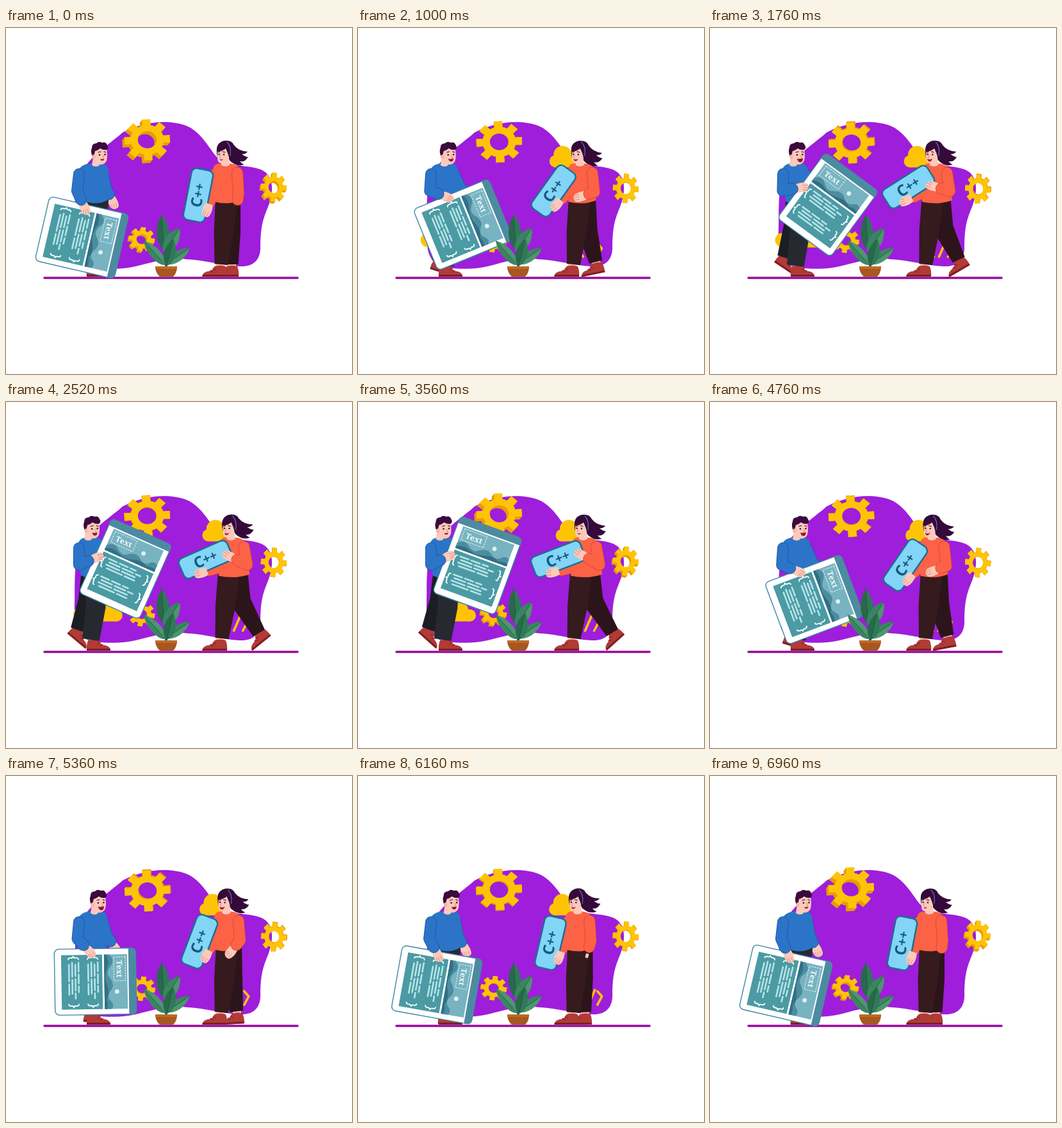
An HTML page that plays this animation: 540 px wide and 540 px high, repeating every 7 s.

```html
<!DOCTYPE html>
<html lang="en">
<head>
<meta charset="utf-8">
<title>App builders</title>
<style>
  html, body { margin: 0; width: 100%; height: 100%; overflow: hidden; background: #fff; }
  svg { display: block; width: 100vw; height: 100vh; }
  .line { fill: none; stroke-linecap: round; stroke-linejoin: round; }
  .cloth { stroke-width: 3; stroke-linejoin: round; }
  .yellow { fill: #fdc406; }
</style>
</head>
<body>
<svg viewBox="0 0 540 540">
  <defs>
    <g id="shoe">
      <path d="M4-22H17V-14H4Z" fill="#f9c2b4"/>
      <path d="M2-16Q10-19 19-16Q21-9 30-8Q37-6 37 0H0Q-1-8 2-16Z" fill="#b23a37"/>
      <path d="M0-3H37V0H0Z" fill="#7c2026"/>
      <path d="M17-10L21-13M21-7L25-10" class="line" stroke="#7c2026"/>
    </g>
    <g id="hand">
      <path d="M-10-6Q-2-8 4-7Q11-6 11-2Q12 4 6 7Q-2 8-10 6Z" fill="#fcc9ba"/>
      <path d="M3-3L10-2M3 1L10 2M2 4L7 5" class="line" stroke="#d9897f" stroke-width=".9"/>
    </g>
  </defs>

  <path fill="#9e1edb" d="M120 222C132 200 158 184 182 163C215 146 250 143 277 151C300 158 312 179 326 198C342 219 374 212 398 221C419 230 419 256 407 284C398 305 397 322 397 345C396 364 384 373 364 372C338 371 310 362 283 361C258 358 236 363 214 369C188 377 152 378 130 372C110 365 106 345 107 312C108 285 104 247 120 222Z"/>
  <path d="M60 390H455" class="line" stroke="#990b9b" stroke-width="3.6"/>
  <g id="gears"></g>

  <g id="cloudL" class="yellow">
    <circle cx="115" cy="331" r="11"/><circle cx="133" cy="319" r="16"/>
    <circle cx="156" cy="326" r="13"/><circle cx="171" cy="333" r="9.5"/>
    <path d="M115 327H171V342.5H115Z"/>
  </g>
  <g id="cloudR" class="yellow">
    <circle cx="325" cy="198" r="14"/><circle cx="314" cy="208" r="9.5"/>
    <circle cx="341" cy="206" r="11"/><path d="M314 205H341V217.500H314Z"/>
  </g>
  <path id="code" class="line" stroke="#fdc406" stroke-width="3.6" d="M349 335L340 346L347 357M365 334L355 357M369 336L376 344L369 357"/>

  <g id="man">
    <g id="mArmB"></g>
    <use id="mShoeB" href="#shoe"/>
    <polygon id="mLegB" fill="#1b1e23"/>
    <use href="#shoe" x="126" y="388"/>
    <polygon id="mLegF" fill="#262a30"/>
    <path id="mBody" class="cloth" fill="#2b74c8" stroke="#2b74c8"/>
    <g id="mHead">
      <path d="M-10-8L10-9Q12 2 10 10Q7 17-1 16L-2 18Q-8 21-13 17L-11 5Z" fill="#fcc9ba"/>
      <path d="M-11 6Q-16-4-13-10Q-13-17-6-17Q-2-21 3-18Q9-20 11-14Q14-10 10-7Q5-6 0-9Q-4-6-8-5Q-10 0-9 5Z" fill="#3b0b3d"/>
      <ellipse cx="-10" cy="4" rx="2.6" ry="3.5" fill="#f5b5a7"/>
      <path d="M-3-3L1-4M6-4L9-3" class="line" stroke="#3b0b3d" stroke-width="1.2"/>
      <circle cx="-1" cy="1" r="1.3" fill="#2a1230"/><circle cx="7.5" cy=".5" r="1.3" fill="#2a1230"/>
      <path d="M4 1L6 5L4 5.5" class="line" stroke="#d9897f"/>
      <path id="mMouth" d="M-3-1Q2 0 6-2Q6 4 2 4Q-2 4-3-1Z" fill="#8c1b2c"/>
    </g>
  </g>

  <g id="tablet">
    <rect x="-51.5" y="-63.5" width="103" height="127" rx="7" fill="#fff" stroke="#3f87a5" stroke-width="1.4"/>
    <path d="M-51.5-52V-57Q-51.5-63.5-45-63.5H45Q51.5-63.5 51.5-57V-52Z" fill="#4c8b9f"/>
    <path d="M-42-50H43V-14H-42Z" fill="#78b3c1"/>
    <path d="M-42-22Q-34-31-25-25Q-14-15-5-23Q6-31 14-24Q24-16 31-24Q37-30 43-25V-14H-42Z" fill="#4b8d9f"/>
    <path d="M-42-17Q-31-23-20-18Q-7-13 5-18Q18-23 28-17Q36-20 43-18V-14H-42Z" fill="#326f86"/>
    <circle cx="16" cy="-33.5" r="3.4" fill="#dcf1f3"/>
    <path d="M-42-11H43V53H-42Z" fill="#4b9aa4"/>
    <rect x="-38" y="-47" width="37" height="18" fill="none" stroke="#e7f8f8" stroke-dasharray="2.5 1.5"/>
    <text x="-19.5" y="-33.5" text-anchor="middle" font-family="'Noto Serif', serif" font-size="12" font-weight="600" fill="#f3ffff">Text</text>
    <g id="blocks" class="line"></g>
  </g>
  <g id="mArmF"></g>

  <g id="woman">
    <g id="wArmB"></g>
    <use id="wShoeB" href="#shoe"/>
    <polygon id="wLegB" fill="#2c151a"/>
    <use href="#shoe" transform="translate(345 388) scale(-1.04 1)"/>
    <polygon id="wLegF" fill="#351a1e"/>
    <path id="wHair" fill="#350a38" d="M-9 5Q-14-17 1-21Q13-23 17-14Q24-5 38-4Q35 0 29 0Q36 5 39 4Q34 13 26 11Q30 16 33 16Q23 20 14 13Q9 10 8 5Z"/>
    <path id="wBody" class="cloth" fill="#fb6246" stroke="#fb6246"/>
    <g id="wHead">
      <path d="M-9-9Q0-13 9-9L9 7L10 17Q3 21-3 17L-3 14Q-9 14-9 6Z" fill="#fcc9ba"/>
      <path d="M-10-4Q-11-19 2-20Q15-19 14-4Q14 5 10 8Q8-1 4-9Q-2-4-10-4Z" fill="#350a38"/>
      <path d="M6-19Q13-12 11 2" class="line" stroke="#5563b5" stroke-width="1.4"/>
      <circle cx="-6.5" r="1.2" fill="#2a1230"/><circle cx="1" cy=".5" r="1.2" fill="#2a1230"/>
      <path d="M-8-3L-5-4M-1-4L3-3" class="line" stroke="#350a38" stroke-width="1.1"/>
      <path d="M-4 1L-6 5L-4 5.5" class="line" stroke="#d9897f"/>
      <path id="wMouth" d="M-5-1Q-1 1 3-1Q1 4-2 3.5Q-5 3-5-1Z" fill="#b02338"/>
    </g>
  </g>

  <g id="phone">
    <rect x="-41" y="-17" width="82" height="34" rx="8" fill="#82d5f7" stroke="#1c6d94" stroke-width="2.4"/>
    <text y="8" text-anchor="middle" font-family="'Open Sans', sans-serif" font-size="24" font-weight="700" fill="#155a7d">C<tspan font-size="20" dy="-1.5">++</tspan></text>
  </g>
  <use id="wHandB" href="#hand"/>
  <g id="wArmF"></g>

  <g id="plant"></g>
  <path d="M233 372H267Q267 382 261 388H240Q233 382 233 372Z" fill="#a6581f"/>
  <path d="M233 372H267L266.5 376H233.5Z" fill="#bf6a29"/>
</svg>

<script>
const LOOP = 7000, STEP = 40, HALF = LOOP / 2;
const $ = id => document.getElementById(id);
const set = (node, attrs) => { for (const k in attrs) node.setAttribute(k, attrs[k]); return node; };
const add = (parent, tag, attrs) =>
  parent.appendChild(set(document.createElementNS('http://www.w3.org/2000/svg', tag), attrs));
const place = (id, x, y, turn = 0, sx = 1, sy = sx) =>
  set($(id), { transform: `translate(${x} ${y}) rotate(${turn}) scale(${sx} ${sy})` });
const mix = (a, b, p) => a + (b - a) * p;
const clamp = v => Math.max(0, Math.min(1, v));

// Bezier timing (.33, 0) (.18, 1), solved by bisection
function ease(u) {
  let lo = 0, hi = 1;
  for (let i = 0; i < 22; i++) {
    const s = (lo + hi) / 2, r = 1 - s;
    const x = 3 * s * r * r * .33 + 3 * s * s * r * .18 + s ** 3;
    if (x < u) lo = s; else hi = s;
  }
  return lo * lo * (3 - 2 * lo);
}

function gearPath(r, turn, hole) {
  const body = r * .72;
  let d = '';
  for (let i = 0; i < 8; i++) {
    [-14, -10.5, 10.5, 14].forEach((off, j) => {
      const a = (i * 45 + turn + off) * Math.PI / 180, rad = j % 3 ? r : body;
      const join = i + j === 0 ? 'M' : j ? 'L' : `A${body} ${body} 0 0 1 `;
      d += `${join}${rad * Math.sin(a)} ${-rad * Math.cos(a)}`;
    });
  }
  return d + `ZM${hole} 0A${hole} ${hole} 0 1 0 ${-hole} 0A${hole} ${hole} 0 1 0 ${hole} 0Z`;
}

const DEPTH = 5;
function makeGear(x, y, r, turn, sx, sy) {
  const d = gearPath(r, turn, r * .41), layers = [];
  for (let i = DEPTH; i >= 0; i--)
    layers.push(add($('gears'), 'path', { d, 'fill-rule': 'evenodd', fill: i ? '#e99a08' : '#fdc406' }));
  return { x, y, r, sx, sy, layers };
}
const gears = [
  makeGear(220.5, 178, 36, -3, 1, .9),
  makeGear(418, 250.5, 23, 4, .88, 1),
  makeGear(212, 331.5, 20.5, 8, 1, .92)
];

// Rocking shows the rim below left, then slightly above right
function drawGears(k) {
  for (const { x, y, r, sx, sy, layers } of gears)
    layers.forEach((layer, i) => {
      const n = 1 - i / DEPTH;
      const cx = x - r * .1 * k * n, cy = y + r * k * (.13 * n - .1);
      set(layer, { transform: `translate(${cx} ${cy}) scale(${sx} ${sy})` });
    });
}

// Code rows and braces on the tablet
for (const top of [-4, 26]) {
  for (let i = 0; i < 4; i++)
    add($('blocks'), 'path', { d: `M${-30 + i % 2 * 3} ${top + i * 5}h${46 + i * 7 % 10}`, stroke: '#b6e4e8',
      'stroke-width': 2.6, 'stroke-dasharray': `${14 + i * 4} 4.5` });
  for (const s of [-1, 1])
    add($('blocks'), 'path', { d: `M${s * 35} ${top}q${s * 3} 0 ${s * 2.5} 5q0 2.5 ${s * 2.5} 3q${-s * 2.5} .5 ${-s * 2.5} 3q${s * .5} 5 ${-s * 2.5} 5`,
      stroke: '#f4ffff', 'stroke-width': 1.9 });
}

function leaf(x, y, tx, ty, w, light, dark) {
  const dx = tx - x, dy = ty - y, len = Math.hypot(dx, dy);
  const nx = -dy / len * w * 1.33, ny = dx / len * w * 1.33;
  const side = (s, n) => `${x + dx * s + nx * n} ${y + dy * s + ny * n}`;
  add($('plant'), 'path', { d: `M${x} ${y}L250 374`, stroke: '#246848', 'stroke-width': 2 });
  [light, dark].forEach((fill, i) => {
    const n = i ? -1 : 1;
    add($('plant'), 'path', { d: `M${x} ${y}C${side(.15, n)} ${side(.7, n)} ${tx} ${ty}Z`, fill });
  });
  add($('plant'), 'path', { d: `M${x} ${y}L${tx} ${ty}`, stroke: '#1d583e', 'stroke-width': .8 });
}
leaf(247, 346, 243, 292, 10, '#2f7958', '#28694c');
leaf(247, 350, 271, 312, 10, '#4b966f', '#3a8560');
leaf(249, 370, 215, 332, 8, '#4b966f', '#3a8560');
leaf(251, 368, 287, 343, 8, '#4b966f', '#3a8560');
leaf(251, 371, 261, 330, 9, '#2f7958', '#28694c');

function makeArm(id, color, edge, hand) {
  const g = $(id);
  const lines = [[edge, 18], [color, 16.5]].map(([stroke, w]) =>
    add(g, 'polyline', { class: 'line', stroke, 'stroke-width': w }));
  return { lines, hand: hand || g.insertBefore(add(g, 'use', { href: '#hand' }), g.firstChild) };
}
const BLUE = ['#2b74c8', '#1c559d'], RED = ['#fb6246', '#d9432f'];
const arms = {
  mBack: makeArm('mArmB', ...BLUE), mFront: makeArm('mArmF', ...BLUE),
  wBack: makeArm('wArmB', ...RED, $('wHandB')), wFront: makeArm('wArmF', ...RED)
};

function drawArm({ lines, hand }, shoulder, [ex, ey], [hx, hy], size = 1) {
  const a = Math.atan2(hy - ey, hx - ex), sleeve = 14;
  const wrist = [hx - sleeve * Math.cos(a), hy - sleeve * Math.sin(a)];
  for (const line of lines) set(line, { points: [shoulder, [ex, ey], wrist].join(' ') });
  hand.setAttribute('transform', `translate(${hx} ${hy}) rotate(${a * 180 / Math.PI}) scale(${size})`);
}

// Trouser leg: tapers from hip to hem; bend moves the knee sideways
function drawLeg(id, hipX, hemX, hemY, hemW, bend = 0) {
  const hipY = 268, kx = (hipX + hemX) / 2 + bend, ky = (hipY + hemY) / 2;
  const len = Math.hypot(hemX - kx, hemY - ky);
  const nx = (hemY - ky) / len, ny = (kx - hemX) / len;
  const at = (x, y, w) => [x + nx * w, y + ny * w];
  set($(id), { points: [[hipX - 17, hipY], [hipX + 17, hipY], at(kx, ky, 15.5), at(hemX, hemY, hemW),
    at(hemX, hemY, -hemW), at(kx, ky, -15.5)].join(' ') });
}

function drawBody(id, neck, chest, chestW, hip, hipW) {
  const l = chest - chestW, r = chest + chestW;
  set($(id), { d: `M${neck - 9} 213H${neck + 9}Q${r} 214 ${r} 227L${hip + hipW} 268Q${hip} 275 ${hip - hipW} 270L${l} 227Q${l} 214 ${neck - 9} 213Z` });
}

function growAt(id, cx, cy, dx, s) {
  set($(id), { transform: `translate(${cx + dx} ${cy}) scale(${s}) translate(${-cx} ${-cy})` });
}

function drawMan(p, smile) {
  const to = (a, b) => mix(a, b, p);
  drawBody('mBody', to(142, 133), to(136.5, 131.5), to(22, 18), to(142, 131), to(15, 13));
  drawLeg('mLegF', to(143, 140), to(139, 132), 371, 13.5, 4 * p);
  drawLeg('mLegB', to(142, 134), to(140, 110), to(371, 355), 11, 5 * p);
  place('mShoeB', to(126, 94), to(388, 360), 42 * p);
  place('mHead', to(147, 134.5), 197);
  place('mMouth', 2, 8, 0, mix(.7, 1, smile), mix(.5, 1.15, smile));
  drawArm(arms.mBack, [to(152, 147), 228], [to(156, 165), to(250, 248)], [to(167, 190), to(272, 258)]);
  drawArm(arms.mFront, [114, 228], [to(111, 114), 254], [123 + 50 * p - 32 * p * p, 281 - 40 * p]);
  place('tablet', 118.5 + 137 * p - 69 * p * p, 327 - 29 * p - 43 * p * p, to(103, 20));
}

function drawWoman(p, smile, sway) {
  const to = (a, b) => mix(a, b, p), lift = p ** 1.5;
  drawBody('wBody', to(341, 350), to(344, 355), to(20, 19), to(345, 356.5), to(18, 23));
  drawLeg('wLegF', to(344, 348), to(336, 337), 369, 10.5);
  drawLeg('wLegB', to(349, 361), to(352, 397), to(369, 360), 10.5, -10 * p);
  place('wShoeB', to(363, 416), mix(388, 363, lift), -42 * lift, -1, 1);
  place('wHead', to(339, 348), 197);
  place('wHair', to(339, 348), 197, sway);
  place('wMouth', -2, 8, 0, mix(.7, 1, smile), mix(.5, 1, smile));
  drawArm(arms.wBack, [to(328, 340), 227], [to(324, 331), to(254, 259)], [to(314, 304), to(284, 266)]);
  drawArm(arms.wFront, [to(361, 372), 226], [to(363, 377), to(257, 254)],
    [346 + 2 * p + 14 * (1 - p) ** 6, 282 - 44 * p], clamp(p * 10));
  place('phone', to(300, 312), to(261, 245), to(-79, -21));
}

function draw(t) {
  const p = t < HALF ? ease(t / HALF) : 1 - ease(t / HALF - 1);
  const angle = 2 * Math.PI * t / LOOP, wave = Math.cos(angle);
  const smile = Math.sin(angle) ** 2;

  drawGears(mix(1, -.4, smile));
  const grow = ease(clamp((HALF - Math.abs(t - HALF)) / 700));
  growAt('cloudL', 142, 326, -2.5 - 6 * wave, grow);
  growAt('cloudR', 326, 203, -2 - 6 * wave, grow);
  growAt('code', 358, 346, 2.5 + 3 * wave, grow);
  drawMan(p, smile);
  drawWoman(p, smile, 3 * Math.sin(2 * angle));
}

function tick() {
  draw(Math.floor(performance.now() % LOOP / STEP) * STEP);
  requestAnimationFrame(tick);
}
tick();
</script>
</body>
</html>
```
